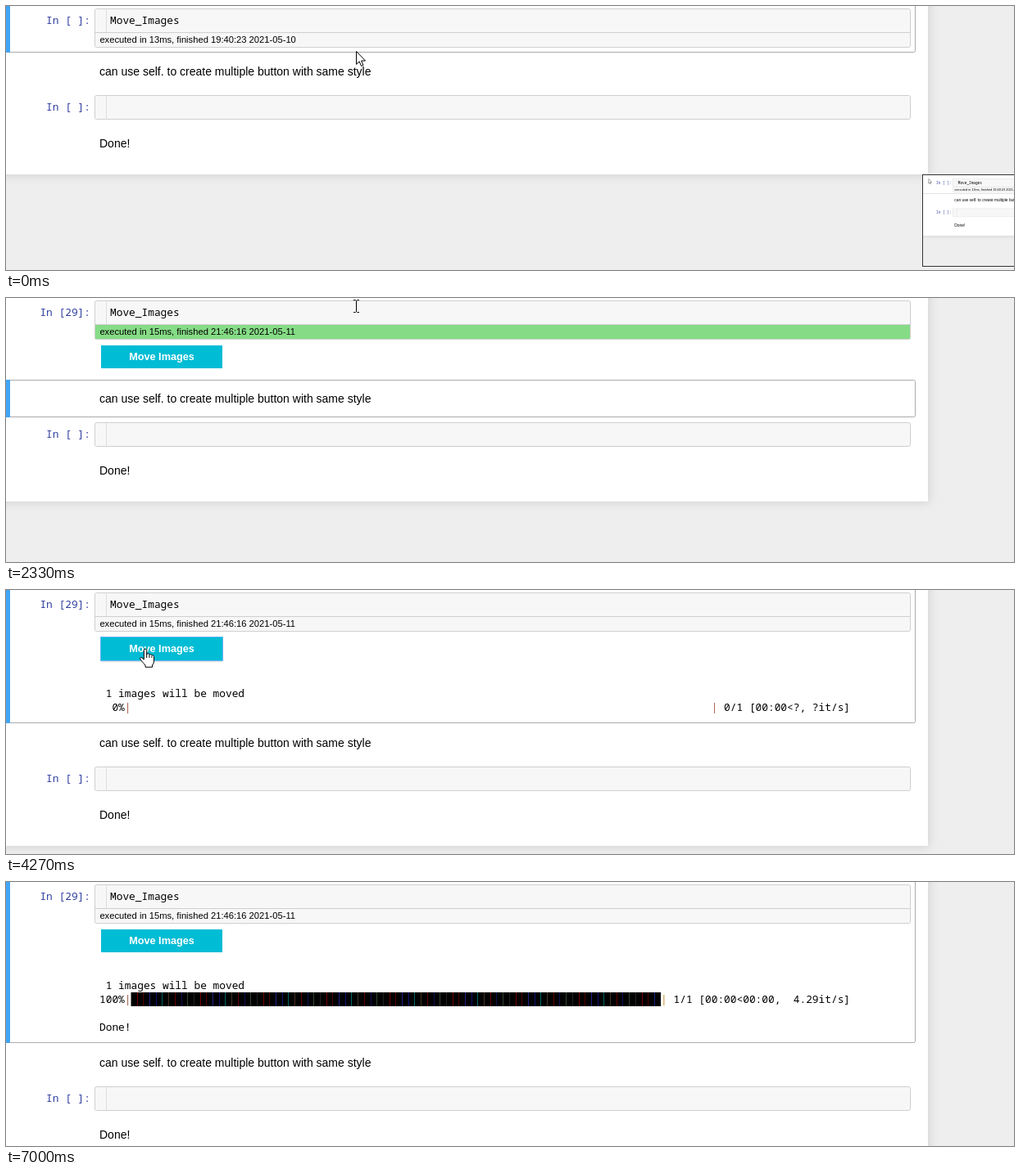
Write an HTML page that moves like this. It is 1230 px wide and 323 px high and loops after 7.14 s.

```html
<!DOCTYPE html>
<html lang="en">
<head>
<meta charset="utf-8">
<title>Notebook button demo</title>
<style>
  html, body { margin: 0; width: 100%; height: 100%; overflow: hidden; background: #eee; }
  svg { display: block; width: 1230px; height: 323px; }
  text { white-space: pre; }
  .sans { font: 14px "Liberation Sans", Arial, sans-serif; }
  .small { font: 11.2px "Liberation Sans", Arial, sans-serif; }
  .label { font: bold 12.7px "Liberation Sans", Arial, sans-serif; fill: #fff; text-anchor: middle; }
  .mono { font: 12.83px "Noto Sans Mono", "DejaVu Sans Mono", monospace; }
  .prompt { fill: #303f9f; text-anchor: end; }
  .pipe { fill: #a0523c; }
</style>
</head>
<body>
<svg id="stage" viewBox="0 0 1230 323"></svg>
<script>
const LOOP = 7140, STEP = 200 / 3, PITCH = 7.698;
const BLUE = '#42a5f5', GREEN = '#66bb6a';
const stage = document.getElementById('stage');
const start = performance.now();

// time, x, y, pointer kind
const path = [
  [0, 427, 55, 'arrow'], [200, 427, 50, 'arrow'], [330, 427, 34, 'arrow'],
  [470, 427, 20, 'beam'], [670, 427, 10, 'beam'], [3130, 427, 10, 'beam'],
  [3330, 148, 132, 'arrow'], [3400, 148, 132, 'arrow'], [3600, 162, 95, 'arrow'],
  [3730, 165, 87, 'arrow'], [3930, 170, 72, 'hand'], [4670, 170, 72, 'hand'],
  [4730, 162, 79, 'hand'], [4930, 120, 130, 'arrow'], [5070, 106, 150, 'arrow'],
  [5130, 106, 150, 'arrow'], [5400, 313, 129, 'arrow'], [5530, 297, 106, 'arrow'],
  [5600, 297, 106, 'arrow'], [6000, 738, 180, 'arrow'], [6330, 262, 299, 'arrow'],
  [6470, 167, 320, 'arrow'], [6530, 167, 340, 'arrow']
];

const pointers = {
  arrow: '<path d="M.5.5V16.4L4.2 12.9 6.5 18.4 8.9 17.4 6.6 12H11.5Z" fill="#fff" stroke="#000"/>',
  beam: '<path d="M-3-7.5H-.5L.5-6.5 1.5-7.5H4M.5-6.5V6.5M-3 7.5H-.5L.5 6.5 1.5 7.5H4" fill="none" stroke="#000"/>',
  hand: `<path d="M-1.7 13V1.7a1.7 1.7 0 0 1 3.4 0V7a1.6 1.6 0 0 1 3.2.6 1.6 1.6 0 0 1 3 .7
    1.5 1.5 0 0 1 2.6 1V15q0 3-2 5v2.3H0V20Q-2 18-5.6 13.5q-1.5-2.5 0-3 1.2-.5 3.9 2.5Z"
    fill="#fff" stroke="#000"/><path d="M1.7 7v4M4.9 8v3M7.9 9v2" stroke="#000"/>`
};

const rect = (x, y, w, h, fill, extra = '') =>
  `<rect x="${x}" y="${y}" width="${w}" height="${h}" fill="${fill}" ${extra}/>`;
const frame = (x, y, w, h, fill, stroke, r = 2) =>
  rect(x + .5, y + .5, w - 1, h - 1, fill, `stroke="${stroke}" rx="${r}"`);
const text = (cls, x, y, s) =>
  `<text class="${cls}" x="${x}" y="${y}">${s.replace(/</g, '&lt;')}</text>`;

function pointerAt(t) {
  let i = path.findIndex(k => k[0] > t);
  if (i < 0) return null;
  const a = path[i - 1], b = path[i], p = (t - a[0]) / (b[0] - a[0]);
  return { x: a[1] + (b[1] - a[1]) * p, y: a[2] + (b[2] - a[2]) * p, kind: p ? b[3] : a[3] };
}

const pointer = ({ x, y, kind }) =>
  `<g transform="translate(${Math.round(x)} ${Math.round(y)})">${pointers[kind]}</g>`;

function selectedCell(top, bottom, bar, border) {
  return frame(0, top, 1110, bottom - top, 'none', border) + rect(0, top, 5, bottom - top, bar);
}

function inputCell(top, height, prompt) {
  return frame(108, top, 996, height, '#f7f7f7', '#cfcfcf') +
    rect(122, top + 1, 1, Math.min(height, 30) - 1, '#ddd') +
    text('mono prompt', 103, top + 19, prompt);
}

function notebook({ shift, prompt, timing, flash = 0, selection = false, mark = '' }) {
  return rect(-40, -61, 1166, 268 + shift, '#575757', 'opacity=".2" style="filter:blur(6px)"') +
    rect(-2, -60, 1127, 266 + shift, '#fff') + mark +
    inputCell(3, 48, prompt) +
    (flash ? rect(109, 33, 994, 17, '#0b0', `opacity="${flash}"`) : '') +
    rect(109, 32, 994, 1, '#cfcfcf') +
    (selection ? rect(127, 9, 85, 17, '#90ee90') : '') +
    text('mono', 127, 22, 'Move_Images') +
    text('small', 114.4, 45, timing) +
    text('sans', 114, 85 + shift, 'can use self. to create multiple button with same style') +
    inputCell(109 + shift, 30, 'In [ ]:') +
    text('sans', 114, 173 + shift, 'Done!');
}

function button(raised, focused) {
  return (raised ? rect(116, 59.5, 148, 27.5, '#000', 'opacity=".35" style="filter:blur(1px)"') : '') +
    rect(116, 58, 148, 28, '#00bcd4') +
    (focused ? frame(115, 57, 150, 30, 'none', '#64b5f6', 0) : '') +
    text('label', 190, 76, 'Move Images');
}

function progress(done) {
  const col = n => 114 + n * PITCH;
  const line = (n, s, cls = 'mono') => text(cls, col(n), 148, s);
  const head = text('mono', 114, 131, ' 1 images will be moved');
  if (!done) {
    return head + line(0, '  0%') + line(4, '|', 'mono pipe') +
      line(97, '|', 'mono pipe') + line(99, '0/1 [00:00<?, ?it/s]');
  }
  const tints = ['#222', '#700', '#500', '#228', '#117', '#066', '#432', '#600', '#115', '#343'];
  let bar = rect(152.5, 135, 646.5, 17, '#000');
  for (let i = 1; i < 84; i++) {
    bar += rect(Math.round(152 + i * PITCH), 135, 1, 17, tints[i % 10]);
  }
  return head + line(0, '100%') + line(4, '|', 'mono pipe') + bar +
    `<g style="fill:#c08a20">${line(89, '|')}</g>` +
    line(91, '1/1 [00:00<00:00,  4.29it/s]') + text('mono', 114, 182, 'Done!');
}

const before = { shift: 0, prompt: 'In [ ]:', timing: 'executed in 13ms, finished 19:40:23 2021-05-10' };

function toast(opacity) {
  return `<g opacity="${opacity}"><clipPath id="card"><rect x="1118" y="206" width="112" height="113"/></clipPath>
    <g clip-path="url(#card)">${rect(1118, 206, 112, 113, '#eee')}
    <g transform="translate(1118 210) scale(.345)">${rect(0, -12, 1125, 20, '#fff')}${
      notebook({ ...before, mark: frame(0, -12, 1110, 69, 'none', '#ababab') })}
    <g transform="translate(22 4)">${pointers.arrow}</g></g></g>
    ${frame(1118, 206, 114, 113, 'none', '#333', 0)}</g>`;
}

function scene(t) {
  const at = pointerAt(t), hover = at && at.kind === 'hand';
  const cursor = at && t < 6530 ? pointer(at) : '';
  if (t < 2070) {
    const edit = t >= 800;
    const caret = edit && (t < 1330 || t >= 1870);
    const mark = edit ? selectedCell(-10, 57, GREEN, GREEN) : selectedCell(-10, 57, BLUE, '#ababab');
    const fade = Math.min(1, 1 - (t - 30) / 1030);
    return notebook({ ...before, mark, selection: edit }) +
      (caret ? rect(127, 9, 1, 17, '#000') : '') +
      (t < 1070 ? toast(fade) : '') + cursor;
  }
  const clicked = t >= 4270, done = t >= 4530;
  const shift = done ? 141 : clicked ? 107 : 43;
  const p = (t - 2120) / 400;
  const flash = p > 0 && p < 1 ? .5 + .5 * Math.cos(Math.PI * p) : 0;
  const mark = clicked ? selectedCell(-10, 57 + shift - 1, BLUE, '#ababab')
                       : selectedCell(100, 146, BLUE, '#ababab');
  const focused = t >= 4130 && t < 7000;
  const promptHover = done && at && at.x < 108 && at.y > 51 && at.y < 192;
  return notebook({ shift, mark, flash, prompt: 'In [29]:',
      timing: 'executed in 15ms, finished 21:46:16 2021-05-11' }) +
    (promptHover ? frame(6, 51, 102, 141, '#f7f7f7', '#d5d5d5') : '') +
    button(hover || focused, focused) +
    (clicked ? progress(done) : '') + cursor;
}

let shown = -1;
function draw() {
  const elapsed = (performance.now() - start) % LOOP;
  const step = Math.floor((elapsed + 4) / STEP);
  if (step !== shown) {
    shown = step;
    stage.innerHTML = scene(Math.round(step * STEP / 10) * 10);
  }
  requestAnimationFrame(draw);
}
draw();
</script>
</body>
</html>
```
